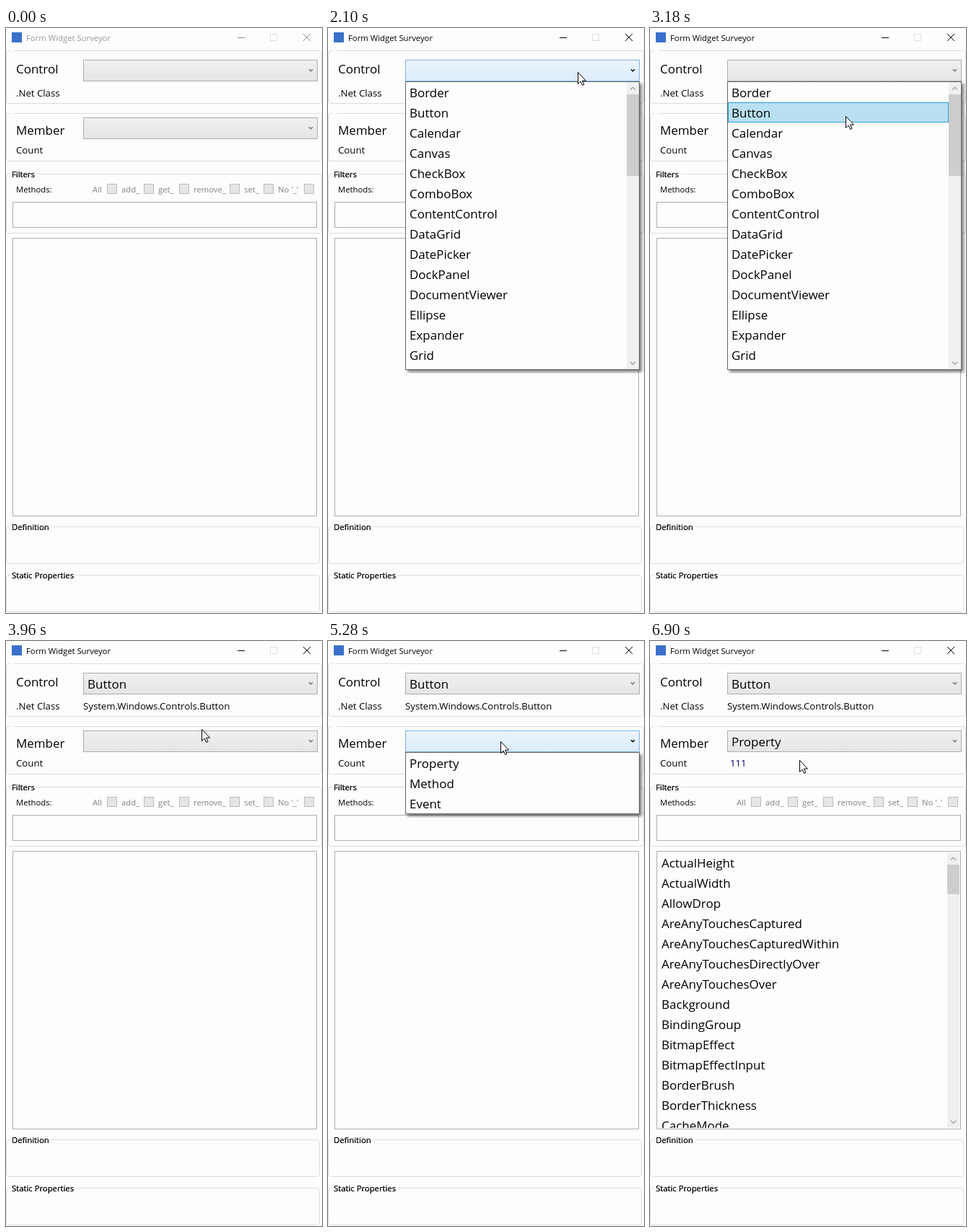
Animation of 438 by 811 pixels, one loop 8 s. Source, as an HTML page with a canvas:

```html
<!DOCTYPE html>
<html lang="en">
<head>
<meta charset="utf-8">
<title>Form Widget Surveyor</title>
<style>
html, body { margin: 0; width: 100%; height: 100%; overflow: hidden; background: #fdfdfd; }
canvas { display: block; }
</style>
</head>
<body>
<canvas id="stage" width="438" height="811"></canvas>
<script>
const ctx = document.getElementById('stage').getContext('2d');
const LOOP = 8000, STEP = 60, ROW = 28;
const BG = '#fdfdfd', GREY = '#acacac';

const controls = ['Border', 'Button', 'Calendar', 'Canvas', 'CheckBox', 'ComboBox',
  'ContentControl', 'DataGrid', 'DatePicker', 'DockPanel', 'DocumentViewer',
  'Ellipse', 'Expander', 'Grid'];
const members = ['Property', 'Method', 'Event'];
const properties = ['ActualHeight', 'ActualWidth', 'AllowDrop', 'AreAnyTouchesCaptured',
  'AreAnyTouchesCapturedWithin', 'AreAnyTouchesDirectlyOver', 'AreAnyTouchesOver',
  'Background', 'BindingGroup', 'BitmapEffect', 'BitmapEffectInput', 'BorderBrush',
  'BorderThickness', 'CacheMode'];
// label, label x, box x
const filters = [['All', 120, 140], ['add_', 160, 191], ['get_', 211, 240],
  ['remove_', 260, 310], ['set_', 330, 357], ["No '_'", 377, 413]];

// time, x, y
const path = [[360, 431, 41], [600, 392, 50], [840, 364, 57], [1140, 346, 61],
  [2280, 346, 61], [2460, 333, 80], [2700, 299, 124], [2880, 277, 139], [3000, 273, 133],
  [3120, 271, 124], [3180, 271, 122], [4440, 271, 122], [4740, 247, 136], [5040, 239, 139],
  [5700, 239, 139], [6000, 222, 154], [6300, 207, 165]];

const menus = [
  { items: controls, top: 74, height: 399, open: 1264, close: 3960, scroll: true },
  { items: members, top: 154, height: 85, open: 5104, close: 6900, scroll: false }
];

function cursorAt(t) {
  if (t < path[0][0]) return null;
  const i = path.findIndex(p => p[0] > t);
  if (i < 0) return path[path.length - 1].slice(1);
  const [t0, x0, y0] = path[i - 1], [t1, x1, y1] = path[i];
  const k = (t - t0) / (t1 - t0);
  return [Math.round(x0 + (x1 - x0) * k), Math.round(y0 + (y1 - y0) * k)];
}

function text(str, x, y, size, color = '#000') {
  ctx.font = `${size * 0.943}px "Open Sans", "Noto Sans", sans-serif`;
  ctx.fillStyle = color;
  ctx.fillText(str, x, y);
}

function box(x, y, w, h, fill, stroke) {
  ctx.fillStyle = fill;
  ctx.fillRect(x, y, w, h);
  if (!stroke) return;
  ctx.strokeStyle = stroke;
  ctx.lineWidth = 1;
  ctx.strokeRect(x + 0.5, y + 0.5, w - 1, h - 1);
}

function line(points, color, width = 1) {
  ctx.strokeStyle = color;
  ctx.lineWidth = width;
  ctx.beginPath();
  points.forEach(([x, y]) => ctx.lineTo(x, y));
  ctx.stroke();
}

function chevron(x, y, w, h, color, width) {
  line([[x - w, y - h], [x, y + h], [x + w, y - h]], color, width);
}

function group(title, y, bottom, right) {
  ctx.strokeStyle = '#d5dfe5';
  ctx.lineWidth = 1;
  ctx.beginPath();
  ctx.roundRect(0.5, y + 0.5, right - 1, bottom - y, 3.5);
  ctx.stroke();
  text(title, 8, y + 5, 12);
  const gap = title ? ctx.measureText(title).width + 5 : 6;
  box(6, y, gap, 1, BG);
  text(title, 8, y + 5, 12);
}

function combo(y, value, hot) {
  const grad = ctx.createLinearGradient(0, y, 0, y + 30);
  grad.addColorStop(0, hot ? '#ecf4fc' : '#f0f0f0');
  grad.addColorStop(1, hot ? '#dcecfc' : '#e5e5e5');
  box(107, y, 325, 30, grad, hot ? '#7eb4ea' : GREY);
  chevron(422.5, y + 14.5, 2.6, 1.3, hot ? '#000' : '#707070', 1.3);
  text(value, 113, y + 22, 18);
}

function scrollbar(x, y, bottom, thumbEnd) {
  box(x, y, 17, bottom - y, '#f0f0f0');
  box(x, y + 17, 17, thumbEnd - y - 17, '#cdcdcd');
  chevron(x + 8.5, y + 9, 3.7, -1.8, '#a3a3a3', 1.2);
  chevron(x + 8.5, bottom - 8.5, 3.7, 1.8, '#a3a3a3', 1.2);
}

function menu(m, t, cursor) {
  const shown = Math.min(1, (t - m.open) / 150);
  ctx.save();
  ctx.beginPath();
  ctx.rect(107, m.top, 331, m.height * shown + 6);
  ctx.clip();
  ctx.translate(0, Math.round(m.height * (shown - 1)));
  ctx.save();
  ctx.shadowColor = 'rgba(0,0,0,.5)';
  ctx.shadowBlur = 4;
  ctx.shadowOffsetX = ctx.shadowOffsetY = 3;
  box(107, m.top, 325, m.height + 1, BG);
  ctx.restore();
  box(107, m.top, 325, m.height + 1, BG, '#646464');
  const first = m.top + 2;
  const hover = Math.floor((cursor[1] - first) / ROW);
  m.items.forEach((item, i) => {
    const y = first + i * ROW;
    if (i === hover) box(108, y - 1, m.scroll ? 306 : 323, ROW, '#b9e0f2', '#26a0da');
    text(item, 113, y + 20, 18);
  });
  if (m.scroll) scrollbar(414, m.top + 1, m.top + m.height, 205);
  ctx.restore();
}

function titleBar(active) {
  const ink = active ? '#000' : '#8a8a8a';
  box(8, 6, 14, 14, '#3a70cb');
  text('Form Widget Surveyor', 28, 18, 12, active ? '#000' : '#999');
  line([[321, 13.5], [331, 13.5]], ink);
  box(366, 8, 10, 10, BG, '#dedede');
  line([[412, 8], [422, 18]], ink);
  line([[422, 8], [412, 18]], ink);
}

function propertyList() {
  ctx.save();
  ctx.beginPath();
  ctx.rect(10, 292, 420, 383);
  ctx.clip();
  properties.forEach((name, i) => text(name, 16, 314 + i * ROW, 18));
  ctx.restore();
  scrollbar(412, 293, 675, 351);
}

function pointer([x, y]) {
  const shape = [[0, 0], [0, 16], [3.6, 12.6], [6.2, 18], [8.4, 17], [6, 11.6], [11, 11.6]];
  ctx.beginPath();
  shape.forEach(([dx, dy]) => ctx.lineTo(x + dx + 0.5, y + dy + 0.5));
  ctx.closePath();
  ctx.fillStyle = '#fff';
  ctx.fill();
  ctx.strokeStyle = '#000';
  ctx.lineWidth = 1;
  ctx.stroke();
}

function draw(t) {
  const cursor = cursorAt(t);
  const open = menus.find(m => t >= m.open && t < m.close);
  const picked = t >= 3960, listed = t >= 6900;
  const over = y => !!cursor && cursor[0] < 432 && cursor[1] >= y && cursor[1] < y + 30 &&
    (!open || open.top === y + 30);

  box(0, 0, 438, 811, BG);
  titleBar(t >= 1200);

  group('', 31, 104, 438);
  text('Control', 14, 63, 18);
  text('.Net Class', 14, 95, 14);
  combo(44, picked ? 'Button' : '', over(44));
  if (picked) text('System.Windows.Controls.Button', 107, 95, 14);

  group('', 118, 184, 438);
  text('Member', 14, 148, 18);
  text('Count', 14, 174, 14);
  combo(124, listed ? 'Property' : '', over(124));
  if (listed) text('111', 111, 174, 14, '#00006b');

  group('Filters', 202, 284, 438);
  text('Methods:', 14, 228, 12);
  filters.forEach(([label, x, boxX]) => {
    text(label, x, 228, 12, '#838383');
    box(boxX, 216, 14, 14, '#e6e6e6', '#bcbcbc');
  });
  box(9, 241, 422, 36, BG, '#abadb3');
  box(9, 291, 422, 386, BG, '#abadb3');
  if (listed) propertyList();

  group('Definition', 691, 742, 435);
  group('Static Properties', 758, 809, 435);

  if (open) menu(open, t, cursor);
  if (cursor) pointer(cursor);
}

const start = performance.now();
function tick() {
  const t = (performance.now() - start) % LOOP;
  draw(Math.floor(t / STEP) * STEP);
  requestAnimationFrame(tick);
}
tick();
</script>
</body>
</html>
```
